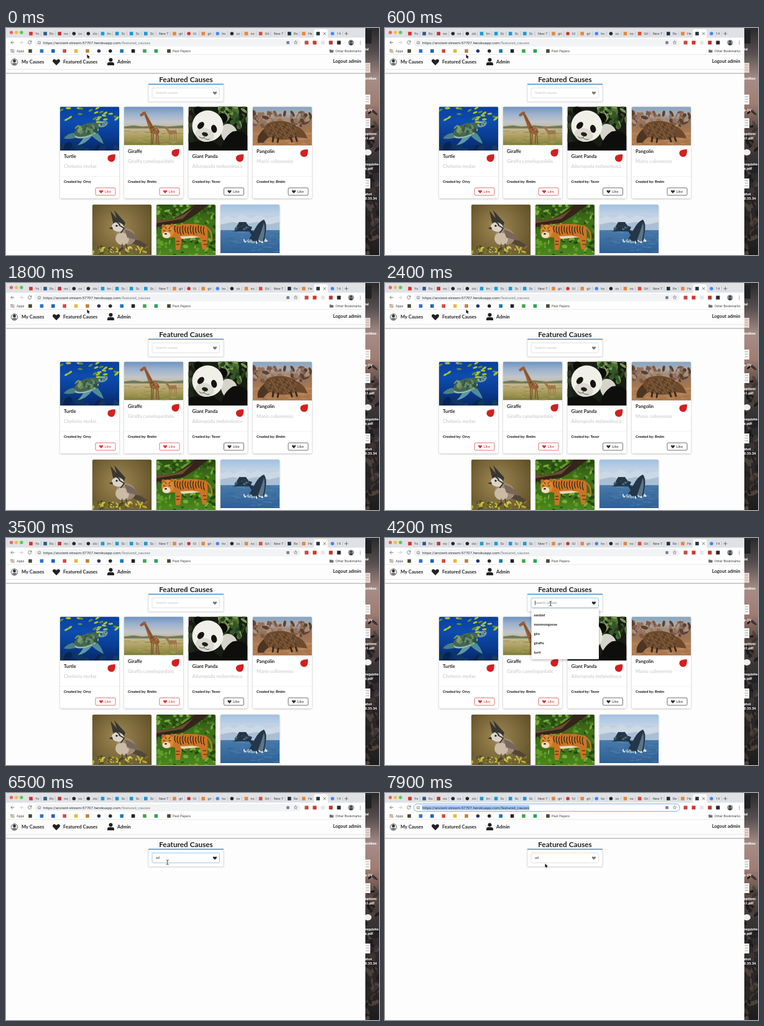
Write an HTML page with a canvas that moves like this. It is 600 px wide and 365 px high and loops after 8 s.

```html
<!DOCTYPE html>
<html lang="en">
<head>
<meta charset="utf-8">
<title>Featured Causes</title>
<style>
html, body { margin: 0; width: 100%; height: 100%; overflow: hidden; background: #fff; }
canvas { display: block; width: 600px; height: 365px; }
</style>
</head>
<body>
<canvas id="stage"></canvas>
<script>
const W = 600, H = 365, LOOP = 8000;
const stage = document.getElementById('stage');
const scale = window.devicePixelRatio || 1;
const UI = 'Roboto, Arial, sans-serif', PAGE = 'Lato, Arial, sans-serif';
let c;

function layer(canvas, draw) {
  canvas.width = W * scale;
  canvas.height = H * scale;
  c = canvas.getContext('2d');
  c.scale(scale, scale);
  draw();
  return canvas;
}

function box(color, x, y, w, h) { c.fillStyle = color; c.fillRect(x, y, w, h); }

function round(x, y, w, h, r, fill, stroke, lw = 0.6) {
  c.beginPath();
  c.roundRect(x, y, w, h, r);
  if (fill) { c.fillStyle = fill; c.fill(); }
  if (stroke) { c.strokeStyle = stroke; c.lineWidth = lw; c.stroke(); }
}

function oval(color, x, y, rx, ry = rx, rot = 0) {
  c.beginPath();
  c.ellipse(x, y, rx, ry, rot, 0, Math.PI * 2);
  c.fillStyle = color;
  c.fill();
}

function shape(color, d) { c.fillStyle = color; c.fill(new Path2D(d)); }

function line(color, d, lw = 1) {
  c.strokeStyle = color;
  c.lineWidth = lw;
  c.lineCap = 'round';
  c.stroke(new Path2D(d));
}

function text(s, x, y, size, color = '#222', font = PAGE, weight = 700, align = 'left') {
  c.font = `${weight} ${size}px ${font}`;
  c.textAlign = align;
  c.fillStyle = color;
  c.fillText(s, x, y);
}

function grad(h, ...stops) {
  const g = c.createLinearGradient(0, 0, 0, h);
  stops.forEach((s, i) => g.addColorStop(i / (stops.length - 1), s));
  return g;
}

function at(x, y, k, draw, rot = 0) {
  c.save();
  c.translate(x, y);
  c.rotate(rot);
  c.scale(k, k);
  draw();
  c.restore();
}

function random(seed) {
  return () => (seed = (seed * 16807) % 2147483647) / 2147483647;
}

function scatter(seed, n, x, y, w, h, r, colors) {
  const rnd = random(seed);
  for (let i = 0; i < n; i++) {
    oval(colors[i % colors.length], x + rnd() * w, y + rnd() * h, r * (0.5 + rnd()), r * (0.3 + rnd() * 0.5), rnd() * 3);
  }
}

function ripples(seed, n, y, h, colors) {
  const rnd = random(seed);
  for (let i = 0; i < n; i++) {
    line(colors[i % colors.length], `M${rnd() * 95} ${y + rnd() * h}h${3 + rnd() * 9}`, 0.7);
  }
}

function heart(x, y, size, color) {
  at(x, y, size / 24, () => shape(color, 'M0 10L-10 0C-16-7-7-14 0-6C7-14 16-7 10 0Z'));
}

function leaf(x, y) {
  shape('#d31f1f', `M${x + 6} ${y - 6}C${x + 7} ${y + 1} ${x + 5} ${y + 6.5} ${x} ${y + 6.2}C${x - 4} ${y + 6} ${x - 6.5} ${y + 3} ${x - 6} ${y - 0.5}C${x - 5.5} ${y - 4.5} ${x - 1} ${y - 5.6} ${x + 6} ${y - 6}Z`);
}

// Pictures, drawn from the corner of each card, 95 wide
function turtle() {
  box(grad(71, '#0a3f9e', '#0d4cae', '#0a3c92', '#072763'), 0, 0, 95, 71);
  scatter(41, 9, 0, 62, 95, 10, 8, ['#0f3560', '#133d62', '#082450']);
  const rnd = random(77);
  for (let i = 0; i < 26; i++) {
    const x = 2 + rnd() * 90, y = 2 + rnd() * 27;
    oval(i % 3 ? '#a9c22f' : '#5d8a3e', x, y, 3.8, 1.6, -0.7 + rnd());
  }
  shape('#4d7f80', 'M27 42Q13 41 6 51Q18 54 33 47Z');
  shape('#5d98a6', 'M40 44Q37 54 28 62Q42 60 52 46Z');
  shape('#4f8c96', 'M56 38Q67 48 70 60Q56 53 48 44Z');
  oval('#9fb9a6', 43, 42, 20, 7, -0.3);
  oval('#456650', 43, 37, 21, 9.5, -0.35);
  scatter(9, 24, 27, 30, 32, 13, 3.4, ['#7f9a62', '#2f5048', '#638a66']);
  oval('#6f9a9c', 69, 28, 8, 4.8, -0.35);
  scatter(19, 10, 63, 25, 11, 5, 1.5, ['#2c5159', '#9bbbb0']);
}

function giraffe() {
  box(grad(62, '#6f93c0', '#9db2cd', '#c3c5c9', '#c3b48a', '#a79a59', '#7a7d3a'), 0, 0, 95, 62);
  shape('#6f7a58', 'M0 32L15 30L30 32L50 30L70 32L95 30V35H0Z');
  ripples(5, 70, 37, 25, ['#a69d55', '#858341', '#b3a462']);
  line('#80512f', 'M44 42V61M47 42L46 60M54 42L56 61M52 42V59', 1.5);
  shape('#965f36', 'M31 9L35 10L47 32Q56 33 57 41L54 45L43 43Z');
  shape('#965f36', 'M25 13L31 8L35 8L35 12L27 16Z');
  scatter(8, 16, 43, 33, 12, 9, 1.2, ['#5d3521', '#c39a66']);
  line('#683d25', 'M34 13L45 33', 0.8);
  line('#9c7448', 'M73 43V54M76 44V54M81 43V53M84 42V53', 1);
  shape('#a0754a', 'M63 34L67 31L73 38L84 38L85 43L73 45L67 36Z');
}

function panda() {
  box('#171d12', 0, 0, 95, 71);
  scatter(16, 60, 50, -2, 46, 34, 5, ['#4f7434', '#27401f', '#7d9a55', '#35562a']);
  scatter(29, 14, 0, 0, 20, 60, 5, ['#2b331f', '#1e2617', '#3b4529']);
  oval('#d6d4ca', 66, 44, 13, 17, -0.4);
  shape('#0e0e0d', 'M52 71Q55 50 71 40Q86 36 95 47V71Z');
  shape('#0e0e0d', 'M0 71V58Q20 54 40 56L60 71Z');
  at(31, 31, 1, () => {
    oval('#0c0c0b', -21, -20, 7, 7);
    oval('#0c0c0b', 20, -18, 8, 8);
    oval('#f0efe8', 0, 0, 25, 25);
    oval('#dcd9d0', -1, 15, 15, 11);
    oval('#141412', -11, 2, 4.5, 6.5, 0.5);
    oval('#141412', 11, 2, 4.5, 6.5, -0.5);
    oval('#20201c', -1, 14, 5, 3.2);
    line('#4a4842', 'M-1 17V20M-1 20Q-6 23-9 20M-1 20Q4 23 8 20', 0.8);
  }, 0.25);
}

function pangolin() {
  box(grad(62, '#86a6c4', '#a9acb0', '#94735e', '#a27650', '#b9855a', '#a8754b'), 0, 0, 95, 62);
  scatter(23, 90, 0, 9, 95, 22, 4, ['#7c5a45', '#96725b', '#5a4133', '#a88f78']);
  box(grad(62, '#b9885c', '#b9885c', '#a8764c'), 0, 42, 95, 20);
  ripples(13, 40, 43, 18, ['#c99a6b', '#98693f']);
  shape('#4d3524', 'M8 58Q5 45 22 33L36 46Q24 48 17 58Z');
  oval('#6b4a2e', 46, 38, 28, 15, 0.08);
  shape('#6b4a2e', 'M66 30Q82 34 88 51L78 50L64 48Z');
  for (let row = 0; row < 6; row++) {
    for (let i = 0; i < 10; i++) {
      const x = 24 + i * 4.6 + (row % 2) * 2.3, y = 27 + row * 4.2 + Math.pow((x - 44) / 14, 2);
      if (y < 50) line((i + row) % 3 ? '#9a7146' : '#3f2a1b', `M${x} ${y}q2.4 1 2 3`, 0.9);
    }
  }
  line('#3c2a1c', 'M33 49L32 56M41 51L40 57M61 50L63 56M69 49L71 55', 3);
}

function bird() {
  const g = c.createRadialGradient(40, 35, 5, 45, 40, 65);
  g.addColorStop(0, '#9a8350');
  g.addColorStop(1, '#5d4d25');
  box(g, 0, 0, 95, 82);
  shape('#6d6334', 'M0 66L31 69L63 74L95 80V82H0Z');
  scatter(37, 45, 0, 67, 90, 12, 3, ['#b9ad35', '#7d7430', '#cfc65a', '#4f492a']);
  shape('#514638', 'M64 50L88 65L84 69L58 60Z');
  oval('#a08a74', 54, 51, 16, 13, 0.35);
  oval('#cbbba6', 48, 55, 11, 10, 0.3);
  shape('#77685a', 'M52 40Q68 43 76 58L56 53Z');
  shape('#383731', 'M34 33L29 10L39 22L35 9L53 29L49 40Z');
  oval('#d9d4c9', 41, 36, 10, 7.5, 0.2);
  line('#37342e', 'M43 33L51 38L46 45M36 25L44 32', 1.8);
  oval('#171714', 39, 34, 1.6);
  shape('#34312a', 'M32 36L26 38L33 40Z');
  line('#3a3429', 'M48 63L47 71M54 63L56 72', 1.2);
}

function tiger() {
  box(grad(82, '#2c4d14', '#3f7019', '#3c7016', '#4c8a1c'), 0, 0, 95, 82);
  scatter(73, 130, 0, 0, 95, 82, 3.6, ['#5f9c28', '#264713', '#478020', '#77ad38']);
  shape('#33251a', 'M0 24Q25 27 43 14L62 0H84Q62 18 42 29L0 36Z');
  shape('#6a4d31', 'M0 24Q25 27 45 15L60 5L42 23L0 30Z');
  line('#c0722b', 'M80 36Q90 42 89 56', 2.6);
  shape('#cc7426', 'M18 36Q48 27 80 34Q85 44 80 72L74 72L70 54L56 51L41 53L38 73L31 73L30 53L20 52Z');
  shape('#e8d8b8', 'M38 51L58 50L70 52L56 54L41 55Z');
  oval('#dc8934', 18, 43, 10, 11);
  oval('#b4682a', 11, 34, 2.6);
  oval('#b4682a', 25, 33, 2.6);
  oval('#eedfc2', 16, 49, 6.5, 5);
  oval('#352519', 15, 47, 2, 1.3);
  line('#2a2017', 'M11 42H14M20 42H23M14 36L16 39M22 36L20 39', 1);
  for (let i = 0; i < 12; i++) {
    const x = 30 + i * 4.2;
    line('#2c2016', `M${x} ${34 + i % 3}q-2 6 1 ${10 + i % 4}`, 1.2);
  }
  line('#2c2016', 'M32 59h5M32 64h5M75 58h5M76 64h5', 1);
}

function whale() {
  box(grad(78, '#a3c0e0', '#bfd2e6', '#bdcfdf', '#5583b0', '#3c70a5', '#2d5d91'), 0, 0, 95, 78);
  shape('#ccd8e4', 'M0 23L11 18L22 22L35 16L48 22L61 17L77 22L95 18V40H0Z');
  shape('#a9bfd3', 'M0 32L20 28L37 32L58 28L78 32L95 28V41H0Z');
  box(grad(78, '#4a7bab', '#4a7bab', '#2f6096'), 0, 41, 95, 37);
  ripples(61, 75, 42, 36, ['#3a6b9f', '#5c8ab5', '#30618f']);
  shape('#25384a', 'M22 43L26 35L30 28H41L45 34L51 36L48 43Z');
  scatter(14, 12, 24, 29, 24, 12, 2, ['#3b5266', '#586f80', '#1d2d3c']);
  shape('#24364a', 'M43 60Q50 50 56 38Q62 27 70 24Q75 31 73 43L70 60Z');
  shape('#5c7688', 'M60 58Q66 43 70 29Q73 40 68 59Z');
  shape('#22344a', 'M54 44L42 37L51 50Z');
  scatter(31, 15, 38, 57, 38, 4, 2.4, ['#dce7eb', '#89afca']);
}

function picture(x, y, h, draw) {
  c.save();
  c.beginPath();
  c.roundRect(x, y, 95, h, [2, 2, 0, 0]);
  c.clip();
  c.translate(x, y);
  draw();
  c.restore();
}

function cardBase(x, y, h) {
  c.save();
  c.shadowColor = 'rgba(0,0,0,.28)';
  c.shadowBlur = 3 * scale;
  c.shadowOffsetY = 0.8 * scale;
  round(x, y, 95, h, 2, '#fff');
  c.restore();
}

function card(x, name, latin, maker, picH, draw, liked) {
  const top = 126.5, base = top + picH + 12;
  cardBase(x, top, 147.5);
  picture(x, top, picH, draw);
  text(name, x + 6, base, 7.6, '#222');
  text(latin, x + 6, base + 16, 7.5, '#d2d2d2');
  leaf(x + 82.5, base);
  box('#e9e9e9', x, 238, 95, 0.6);
  text('Created by: ' + maker, x + 6, 249, 5.8, '#111');
  const tint = liked ? '#d93636' : '#333';
  round(x + 57, 257, 32, 12, 1.8, '#fff', tint, 0.7);
  heart(x + 66, 263.3, 6.2, tint);
  text('Like', x + 71.5, 265.2, 6, tint, PAGE, 400);
}

function cards() {
  card(87, 'Turtle', 'Chelonia mydas', 'Orvy', 70.5, turtle, true);
  card(190, 'Giraffe', 'Giraffa camelopardalis', 'Brelm', 62, giraffe, true);
  card(293.5, 'Giant Panda', 'Ailuropoda melanoleuca', 'Tavor', 70.5, panda, false);
  card(397, 'Pangolin', 'Manis culionensis', 'Brelm', 62.5, pangolin, false);
  [[139, bird, 82], [242, tiger, 82], [345, whale, 78]].forEach(([x, draw, h]) => {
    cardBase(x, 284, 100);
    picture(x, 284, h, draw);
  });
}

// Tabs: title, icon colour, d for disc
const TABS = [
  ['Yo', '#e22b2b'], ['Ro', '#315a88'], ['no:', '#bf3535'], ['co', '#24292e', 'd'], ['clo', '#24292e', 'd'],
  ['Im', '#189bd7'], ['Sc', '#189bd7'], ['Sc', '#189bd7'], ['Sc', '#189bd7'], ['New T'],
  ['git', '#e6883c'], ['IU', '#d2302b', 'd'], ['git', '#e6883c'], ['ho', '#4285f4', 'd'], ['co', '#24292e', 'd'],
  ['no', '#e6883c'], ['Git', '#df4b35'], ['New T'], ['Re', '#1f3440'], ['He', '#e6883c'],
  ['', '#1f3440'], ['14', '#4285f4', 'd']
];
const MARKS = ['#4a4630', '#2d70c9', '#1e64b7', '#d34a3f', '#e8b93b', '#bd813b', '#24356f', '#24292e', '#1879b5', '#222', '#43a54b', '#28a553'];
const EXTENSIONS = ['#cb4741', '#d0342f', '#e3e5e8', '#b5352f', '#2a2a2c'];

function badge(x, y, color, disc, size = 5.6) {
  if (disc) oval(color, x, y, size / 2);
  else box(color, x - size / 2, y - size / 2, size, size);
}

function browser() {
  box('#fff', 0, 0, 578, H);
  box('#dfe1e5', 0, 0, 578, 15.5);
  ['#ee6158', '#f3bd40', '#5ac550'].forEach((k, i) => oval(k, 8.5 + i * 8.2, 7.2, 2.6));
  round(495.5, 2, 22, 14, [3, 3, 0, 0], '#fff');
  TABS.forEach(([name, color, disc], i) => {
    const x = 40 + i * 23.1;
    if (color) badge(x, 9, color, disc);
    text(name, x + (color ? 7 : -2), 11, 5.5, '#454a50', UI, 400);
    if (i < 19 || i > 20) box('#a5a9ae', x + 16, 5.5, 0.5, 7);
  });
  line('#555', 'M510.5 7l4 4M514.5 7l-4 4', 0.8);
  line('#555', 'M545 9h5M547.5 6.5v5', 0.8);

  line('#5d6165', 'M13 23.3H8M10.2 21L8 23.3l2.2 2.3', 0.8);
  line('#b9bcbf', 'M22 23.3h5M24.8 21l2.2 2.3-2.2 2.3', 0.8);
  line('#5d6165', 'M40.5 21.3a2.8 2.8 0 1 0 .5 3M41 20.5v2h-2', 0.8);
  EXTENSIONS.forEach((k, i) => badge(483.5 + i * 13, 23.5, k, false, 6));
  oval('#879096', 555, 23.5, 4.6);
  oval('#393b3d', 555, 22, 1.7);
  oval('#393b3d', 555, 26, 2.8, 1.8);
  [-2.4, 0, 2.4].forEach(d => oval('#5f6368', 570, 23.5 + d, 0.7));

  const dots = ['#db5147', '#4d91e2', '#e9ae37', '#56a563'];
  for (let i = 0; i < 9; i++) box(dots[i % 4], 7.5 + (i % 3) * 2.1, 34 + Math.floor(i / 3) * 2.1, 1.5, 1.5);
  text('Apps', 17, 39, 5.4, '#444', UI, 400);
  MARKS.forEach((k, i) => badge(39 + i * 18.4, 37, k, [6, 7].includes(i)));
  badge(262, 37, '#4a4630');
  text('Past Papers', 268, 39, 5.4, '#444', UI, 400);
  shape('#6a6d70', 'M520.5 34.7h2.4l.8.8h3v4h-6.2Z');
  text('Other Bookmarks', 530, 39, 5.4, '#444', UI, 400);
  box('#d9dbde', 0, 42.5, 578, 0.6);
}

function page() {
  box('#fdfdfd', 0, 43, 578, 322);
  box('#e4e4e4', 0, 66, 578, 0.8);
  box('#929292', 0, 72.5, 578, 0.9);
  round(8.2, 49.5, 10.6, 10.6, 5.3, '#e5e5e5', '#555', 0.8);
  oval('#333', 13.5, 53, 2.4);
  oval('#777', 13.5, 58, 3.6, 1.9);
  text('My Causes', 25, 57, 7.5);
  heart(81, 55, 12, '#222');
  text('Featured Causes', 92, 57, 7.5);
  oval('#222', 168.5, 51.2, 3);
  shape('#222', 'M163 60v-2q0-3 3.2-3h4.6q3.2 0 3.2 3v2Z');
  text('Admin', 179, 57, 7.5);
  text('Logout admin', 571.5, 56, 7.5, '#222', PAGE, 700, 'right');
  text('Featured Causes', 289.5, 87, 11.8, '#222', PAGE, 700, 'center');
  c.save();
  c.shadowColor = 'rgba(0,0,0,.18)';
  c.shadowBlur = 2 * scale;
  c.shadowOffsetY = 0.6 * scale;
  round(229, 90, 121, 28.5, 1.5, '#fff', '#dedede', 0.5);
  c.restore();
  box('#3489cf', 229, 89.8, 121, 1.3);
}

function desktop() {
  box(grad(H, '#2b292b', '#574f50', '#a68d87', '#a07d72', '#5c4a44', '#3a3537', '#2d2a2d', '#2b2726', '#2a2625', '#1d1b1b'), 0, 0, W, H);
  c.save();
  c.beginPath();
  c.rect(578, 130, 22, 235);
  c.clip();
  scatter(83, 70, 578, 135, 22, 230, 5, ['#3d3432', '#242122', '#4d413b', '#1d1b1c']);
  c.restore();
  const label = (s, y) => text(s, 577.5, y, 5.5, '#fff', UI, 700);
  const file = (y, fill, ...names) => {
    box(fill, 576, y - 8, 10, 16);
    for (let i = -5; i < 6; i += 4) box('#a7a7a7', 579, y + i, 5, 0.8);
    names.forEach((s, i) => label(s, y + 19 + i * 6.7));
  };
  box('#202226', 576, 3, 12, 22);
  label('ial', 36);
  file(64, '#e6d3c8', 'andboo');
  file(115, '#f2f2f0', 's-CV');
  file(153, '#efefed', 'options', 'r2.pdf');
  oval('#eeeeeb', 582, 200, 6, 5);
  label('requisite', 221);
  label('s.pdf', 227.5);
  file(250, '#f4f4f4', 'shot', '0.35.34');
}

function address(selected) {
  round(46, 17.5, 428, 12, 6, selected ? '#fff' : '#f1f3f4', selected ? '#82aee8' : null, 1);
  oval('#666', 53.5, 23.5, 2.5);
  oval('#f1f3f4', 53.5, 23.5, 1.9);
  box('#666', 53.2, 23, 0.7, 1.8);
  const host = 'https://ancient-stream-57707.herokuapp.com', path = '/featured_causes';
  c.font = `400 6.16px ${UI}`;
  const w = c.measureText(host).width;
  if (selected) box('#a4c8f4', 60, 19.5, c.measureText(host + path).width, 8);
  text(host, 60, 25.7, 6.16, '#30343a', UI, 400);
  text(path, 60 + w, 25.7, 6.16, selected ? '#30343a' : '#777c82', UI, 400);
  badge(453.5, 23.5, '#74799b', false, 4.5);
  line('#62666b', 'M466 20.3l.8 2 2.1.1-1.7 1.4.6 2.1-1.8-1.2-1.8 1.2.6-2.1-1.7-1.4 2.1-.1Z', 0.55);
}

function search(value, focus, caret) {
  round(235, 96.3, 108.5, 16, 2, '#fff', focus ? '#85b7d9' : '#d7d8d9', 0.8);
  text(value || 'Search causes', 241, 106.4, 5.8, value ? '#333' : focus ? '#8c8c8c' : '#c3c3c3', PAGE, 400);
  const x = 241 + (value ? c.measureText(value).width + 0.3 : 0);
  if (caret) box('#222', x, 100.7, 0.7, 7.2);
  heart(336, 104.7, 6.4, focus ? '#222' : '#777');
}

function suggestions() {
  c.save();
  c.shadowColor = 'rgba(0,0,0,.35)';
  c.shadowBlur = 4 * scale;
  c.shadowOffsetY = scale;
  round(235.5, 113.5, 108.5, 81.5, 1.5, '#fff');
  c.restore();
  ['aasdad', 'monmongoose', 'gira', 'giraffe', 'turti'].forEach((s, i) => text(s, 239.5, 126 + i * 15, 5.7, '#222'));
}

// Pointer stops: time, x, y
const STOPS = [[2900, 130.5, 42.5], [3400, 289.8, 83], [3550, 289.8, 83], [3850, 266.3, 105.5], [6200, 266.3, 105.5], [6650, 257.5, 113.5]];

function pointerAt(t) {
  const i = STOPS.findIndex(s => s[0] > t);
  if (i === 0) return STOPS[0].slice(1);
  if (i < 0) return STOPS[STOPS.length - 1].slice(1);
  const [t0, x0, y0] = STOPS[i - 1], [t1, x1, y1] = STOPS[i];
  const p = (t - t0) / (t1 - t0), e = p * p * (3 - 2 * p);
  return [x0 + (x1 - x0) * e, y0 + (y1 - y0) * e];
}

function pointer(t) {
  const [x, y] = pointerAt(t);
  const overTitle = x > 246 && x < 333 && y > 76 && y < 89;
  const overInput = x > 235 && x < 344 && y > 96 && y < 112.5;
  c.save();
  c.translate(x, y);
  if (overTitle || overInput) {
    const beam = 'M-1.6-3.7Q0-3.7 0-2.6V2.6Q0 3.7-1.6 3.7M1.6-3.7Q0-3.7 0-2.6M0 2.6Q0 3.7 1.6 3.7';
    line('#fff', beam, 1.5);
    line('#222', beam, 0.8);
  } else {
    const arrow = 'M0 0V6.2L1.5 4.9 2.5 7.1 3.6 6.6 2.6 4.5H4.5Z';
    line('#fff', arrow, 1);
    shape('#111', arrow);
  }
  c.restore();
}

const base = layer(document.createElement('canvas'), () => { desktop(); browser(); page(); });
const grid = layer(document.createElement('canvas'), cards);
layer(stage, () => {});
const screen = c;

function draw(t) {
  c = screen;
  c.drawImage(base, 0, 0, W, H);
  const focus = t >= 3900 && t < 6800;
  const value = t < 4650 ? '' : t < 4850 ? 'a' : 'ad';
  const typing = t >= 4650 && t < 6200;
  const blink = typing && t < 5300 || (t - 3900) % 1000 < 500;
  address(t >= 7300);
  search(value, focus, focus && blink);
  if (t < 4850) c.drawImage(grid, 0, 0, W, H);
  if (t >= 3900 && t < 4650) suggestions();
  if (!typing) pointer(t);
}

const start = performance.now();
function tick(now) {
  draw(Math.max(0, now - start) % LOOP);
  requestAnimationFrame(tick);
}
draw(0);
requestAnimationFrame(tick);
</script>
</body>
</html>
```
